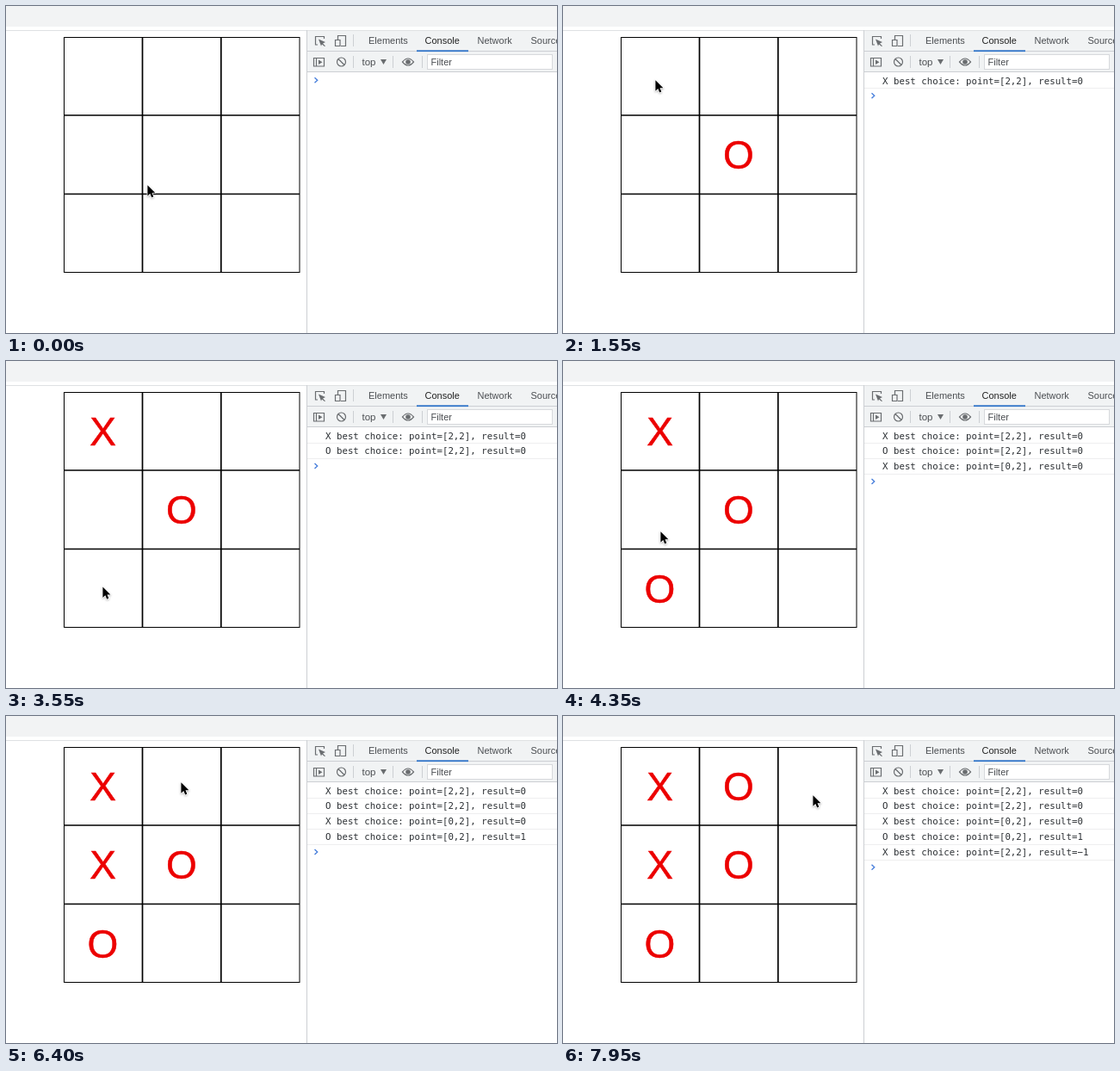
Animation of 640 by 380 pixels, one loop 8000 ms. Source, as an HTML page:

```html
<!DOCTYPE html>
<html lang="en">
<head>
<meta charset="utf-8">
<title>Tic-tac-toe console</title>
<style>
  html, body { margin: 0; width: 100%; height: 100%; overflow: hidden; background: #fff; }
  svg { display: block; }
  .ui { font: 11px "Liberation Sans", Arial, sans-serif; fill: #4b4e52; }
  .log { font: 10.75px "DejaVu Sans Mono", monospace; fill: #2b2f33; white-space: pre; }
  .mark { font: 46px "Liberation Sans", Arial, sans-serif; fill: #ec0000; stroke: #ec0000; stroke-width: .5; text-anchor: middle; }
  .icon { fill: none; stroke: #6a6d70; stroke-width: 1.2; }
  .solid { fill: #6a6d70; stroke: none; }
  .rule { fill: #cccfd3; }
</style>
</head>
<body>
<svg width="640" height="380" viewBox="0 0 640 380">
  <rect width="640" height="24" fill="#f2f3f4"/>
  <rect y="28" width="640" height="1" fill="#dfe1e3"/>

  <g id="board" fill="none" stroke="#000">
    <rect x="67.5" y="36.5" width="273.5" height="273"/>
    <path d="M158.500 36V310M249.800 36V310M67 127H341M67 218.500H341" stroke-width="1.700"/>
  </g>

  <g id="devtools">
    <rect x="349" y="29" width="291" height="48" fill="#f1f3f4"/>
    <rect class="rule" x="349" y="28" width="1" height="352"/>
    <path class="rule" d="M350 52h290v1h-290zM350 76h290v1h-290z"/>
    <rect x="477" y="51.300" width="60" height="1.800" fill="#2f74c8"/>
    <path class="rule" d="M403 33h1v14h-1zM403 58h1v14h-1zM449 58h1v14h-1zM483 58h1v14h-1z"/>
    <rect x="489.500" y="56.500" width="145" height="17" fill="#fff" stroke="#d7d9dc"/>

    <g class="icon">
      <path d="M362 45H359.500V35.500H369.500V38"/>
      <path class="solid" d="M363 38.500L371 42 368 43.500 371 46.500 370 47 367 44.500 366 46.500Z"/>
      <path d="M385.500 39V34.500H394.500V46.500H389M382.500 39.500H388V46.500H382.500Z"/>
      <path d="M357.500 60.500H369.500V70H357.500ZM360.500 60.500V70"/>
      <path class="solid" d="M363 62.500L367.500 65.300 363 68Z"/>
      <circle cx="389.500" cy="65" r="5"/>
      <path d="M386 61.500L393 68.500"/>
      <path d="M460.500 65Q467 57 473.500 65Q467 73 460.500 65Z"/>
      <circle class="solid" cx="467" cy="65" r="2.800"/>
      <path class="solid" d="M435 62H442L438.500 68Z"/>
    </g>

    <g class="ui">
      <text x="421" y="44">Elements</text>
      <text x="486.500" y="44" fill="#222">Console</text>
      <text x="547.500" y="44">Network</text>
      <text x="609.500" y="44">Sources</text>
      <text x="413.500" y="68.500" font-size="11.500">top</text>
      <text x="493.500" y="69">Filter</text>
    </g>
  </g>

  <g id="turns"></g>
  <path id="prompt" d="M358.500 -3L361.700 0 358.500 3" fill="none" stroke="#4a80dc" stroke-width="1.400"/>
  <path id="cursor" d="M0 0V12.500L2.900 9.800 4.800 14.200 6.900 13.300 5.100 9.100H9Z" stroke="#fff"
    stroke-width="1.600" stroke-linejoin="round" paint-order="stroke"
    style="filter: drop-shadow(0 1px 1px #0004)"/>
</svg>
<script>
const LOOP = 8000, STEP = 50, PITCH = 91.4, ROW = 17.9;
const $ = id => document.getElementById(id);

// Players alternate, O first; cells count from 0 in reading order.
const turns = [
  { at: 450, cell: 4, point: '2,2', result: '0' },
  { at: 2350, cell: 0, point: '2,2', result: '0' },
  { at: 3700, cell: 6, point: '0,2', result: '0' },
  { at: 4600, cell: 3, point: '0,2', result: '1' },
  { at: 6500, cell: 1, point: '2,2', result: '−1' }
];

// Pointer moves: arrival time, duration, x, y
const home = [164, 208];
const moves = [
  [100, 50, 177, 186], [550, 150, 184, 165],
  [1200, 200, 138, 122], [1550, 350, 107, 86], [2500, 200, 104, 78],
  [2700, 100, 114, 171], [2900, 200, 112, 264], [3700, 200, 112, 257],
  [4350, 300, 113, 198], [4600, 250, 111, 167], [5400, 100, 109, 155],
  [5700, 150, 167, 131], [6200, 500, 203, 77],
  [7100, 600, 274, 152], [7950, 550, 290, 92]
];

function add(parent, tag, attributes, content = '') {
  const el = document.createElementNS('http://www.w3.org/2000/svg', tag);
  for (const name in attributes) el.setAttribute(name, attributes[name]);
  el.textContent = content;
  return parent.appendChild(el);
}

const groups = turns.map(({ cell, point, result }, i) => {
  const [mark, next] = i % 2 ? 'XO' : 'OX';
  const group = add($('turns'), 'g');
  const x = 112.5 + cell % 3 * PITCH, y = 97.7 + Math.floor(cell / 3) * PITCH;
  add(group, 'text', { class: 'mark', x, y }, mark);
  add(group, 'text', { class: 'log', x: 371, y: 90.5 + i * ROW },
    `${next} best choice: point=[${point}], result=${result}`);
  add(group, 'rect', { x: 350, y: Math.round(95 + i * ROW), width: 290, height: 1, fill: '#eeeeef' });
  return group;
});

function pointerAt(t) {
  let [x, y] = home;
  for (const [end, duration, toX, toY] of moves) {
    const k = Math.min(1, Math.max(0, 1 + (t - end) / duration));
    x += (toX - x) * k;
    y += (toY - y) * k;
  }
  return [x, y];
}

function draw(now) {
  const t = Math.floor(now % LOOP / STEP) * STEP;
  const [x, y] = pointerAt(t);
  const played = turns.filter(turn => t >= turn.at).length;
  groups.forEach((group, i) => group.setAttribute('visibility', i < played ? 'visible' : 'hidden'));
  $('prompt').setAttribute('transform', `translate(0 ${86.3 + played * ROW})`);
  $('cursor').setAttribute('transform', `translate(${x + .4} ${y + .2})`);
}

const start = performance.now();
function tick() {
  draw(performance.now() - start);
  requestAnimationFrame(tick);
}
tick();
</script>
</body>
</html>
```
